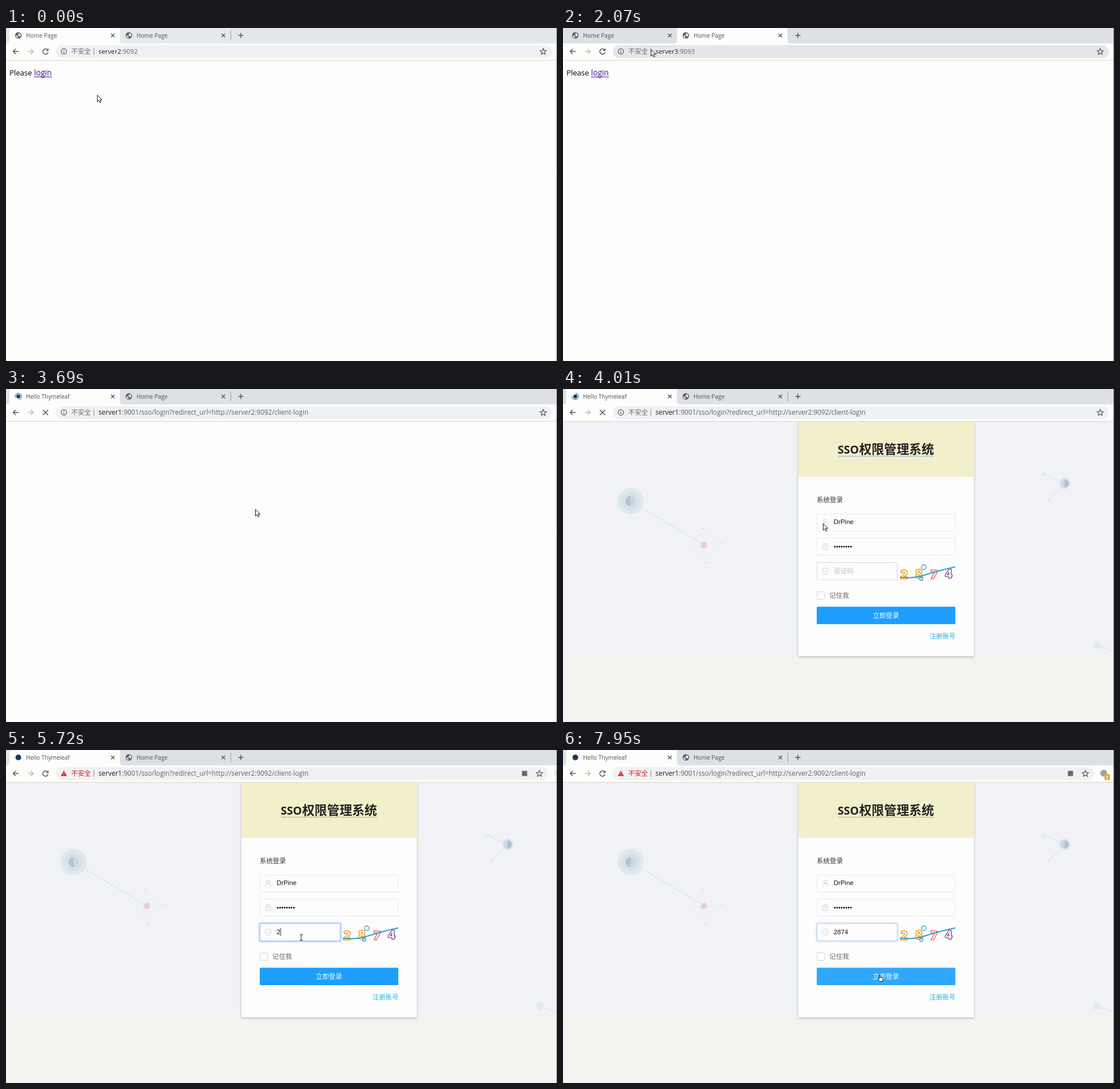
Animation, 962 px wide and 582 px high, one loop 7.99 s. Source, as an HTML page:

```html
<!DOCTYPE html>
<html lang="zh-CN">
<head>
<meta charset="utf-8">
<title>SSO login</title>
<style>
html, body { margin: 0; width: 100%; height: 100%; overflow: hidden; background: #fdfdfb; }
svg { display: block; }
text { font-family: "Open Sans", "Noto Sans CJK SC", "Noto Sans CJK", sans-serif; white-space: pre; }
.cjk { font: 11.4px "Noto Sans CJK SC", "Noto Sans CJK", sans-serif; }
.field { font: 11.4px "Liberation Sans", Arial, sans-serif; fill: #111; }
.tab { font-size: 10.1px; fill: #4b5054; }
.url { font-size: 11.35px; fill: #5f6368; }
.long { font-size: 11.7px; }
.host { fill: #202124; }
.line { fill: none; stroke: #54585c; stroke-width: 1.5; }
.soft { fill: none; stroke: #cfcfcf; }
.box { fill: #fdfdfd; stroke: #ebebeb; }

/* step: hard switches, ease: continuous motion */
.step { animation: 7.99s step-end infinite; }
.ease { animation: 7.99s linear infinite; }

#strip { animation-name: strip; }
@keyframes strip { 0% { fill: #e2e8ea } 18.77%, 100% { fill: #dde1e6 } }
.first { animation-name: first; }
@keyframes first { 0% { opacity: 1 } 18.77% { opacity: 0 } 31.79%, 100% { opacity: 1 } }
.second { animation-name: second; }
@keyframes second { 0% { opacity: 0 } 18.77% { opacity: 1 } 31.79%, 100% { opacity: 0 } }
#hover2 { animation-name: hover2; }
@keyframes hover2 { 0%, .5% { opacity: .12 } 2.5%, 14.4% { opacity: 0 } 16.2%, 18.7% { opacity: .7 } 18.8%, 100% { opacity: 0 } }
#hover1 { animation-name: hover1; }
@keyframes hover1 { 0%, 29.6% { opacity: 0 } 31%, 31.7% { opacity: .7 } 31.8%, 100% { opacity: 0 } }
#divider { animation-name: divider; }
@keyframes divider { 0% { opacity: 1 } 14.8% { opacity: 0 } 31.79%, 100% { opacity: 1 } }
.before { animation-name: before; }
@keyframes before { 0% { opacity: 1 } 43.8%, 100% { opacity: 0 } }
.after { animation-name: after; }
@keyframes after { 0% { opacity: 0 } 43.8%, 100% { opacity: 1 } }
.idle { animation-name: idle; }
@keyframes idle { 0% { opacity: 1 } 39.42% { opacity: 0 } 53.82%, 100% { opacity: 1 } }
.busy { animation-name: busy; }
@keyframes busy { 0% { opacity: 0 } 39.42% { opacity: 1 } 53.82%, 100% { opacity: 0 } }
#globe { animation-name: globe; }
@keyframes globe { 0% { opacity: 1 } 39.42%, 100% { opacity: 0 } }
#logo { animation-name: logo; }
@keyframes logo { 0%, 43.8% { r: 3.4px } 53.82%, 100% { r: 5px } }
#spin { animation: spin .99875s linear infinite; transform-origin: 21.5px 13px; }
@keyframes spin { to { transform: rotate(360deg) } }

#bar { animation-name: bar; }
@keyframes bar {
  0%, 21% { fill: #eff0f2; width: 866px } 22.5%, 27.9% { fill: #e6e7e9; width: 866px }
  29.5%, 71.09% { fill: #eff1f3; width: 866px } 73.09%, 100% { fill: #eff1f3; width: 840px }
}
#actions { animation-name: actions; }
@keyframes actions { 0%, 71.09% { transform: none } 73.09%, 100% { transform: translateX(-26px) } }
#extension { animation-name: extension; }
@keyframes extension { 0%, 71.09% { transform: translateX(26px); opacity: 0 } 73.09%, 100% { transform: none; opacity: 1 } }
#translate { animation-name: translate; }
@keyframes translate { 0% { opacity: 0 } 55.07%, 100% { opacity: 1 } }
#pill { animation-name: pill; }
@keyframes pill { 0%, 55% { opacity: 0 } 55.6%, 64.5% { opacity: 1 } 69%, 100% { opacity: 0 } }
.safe { animation-name: safe; }
@keyframes safe { 0% { opacity: 1 } 68.96%, 100% { opacity: 0 } }
.warn { animation-name: warn; }
@keyframes warn { 0% { opacity: 0 } 68.96%, 100% { opacity: 1 } }

#login { animation-name: login; }
@keyframes login { 0% { opacity: 0 } 49.69%, 100% { opacity: 1 } }
#focus { animation-name: focus; }
@keyframes focus { 0%, 60.83% { opacity: 0 } 64.6%, 98.4% { opacity: 1 } 99.5%, 100% { opacity: .5 } }
#typed { animation-name: typed; }
@keyframes typed { 0% { width: 0 } 68.96% { width: 6.5px } 76.6% { width: 12.9px } 82.23% { width: 19.2px } 90.86%, 100% { width: 32px } }
#caret { animation-name: caret; }
@keyframes caret {
  0% { opacity: 0; transform: none } 60.83% { opacity: 1; transform: none } 67.46% { opacity: 0; transform: none }
  68.96% { opacity: 1; transform: translateX(6.3px) } 75.59% { opacity: 0; transform: translateX(6.3px) }
  76.6% { opacity: 1; transform: translateX(12.7px) } 82.23% { opacity: 1; transform: translateX(19px) }
  88.73% { opacity: 0; transform: translateX(19px) } 90.86% { opacity: 1; transform: translateX(25.4px) }
  97.5%, 100% { opacity: 0; transform: translateX(25.4px) }
}
#button { animation-name: button; }
@keyframes button { 0%, 96% { fill: #1e9fff } 97.6%, 100% { fill: #30a7fe } }

#mouse { animation-name: mouse; animation-timing-function: ease-in-out; }
@keyframes mouse {
  0%, 8.1% { transform: translate(159px, 117px) }
  9% { transform: translate(161px, 120px) }
  15.6%, 18.8% { transform: translate(249.3px, 20px) }
  22.8% { transform: translate(175px, 62px) }
  25.9% { transform: translate(153.3px, 37px) }
  27.9% { transform: translate(150px, 40px) }
  31%, 32.3% { transform: translate(110px, 14px) }
  37.5%, 39.2% { transform: translate(64px, 77px) }
  46.2% { transform: translate(435px, 210px) }
  48.2%, 49.2% { transform: translate(452px, 232px) }
  57.5%, 91.4% { transform: translate(515.5px, 327.5px) }
  98.1%, 100% { transform: translate(553px, 393px) }
}
#arrow { animation-name: arrow; }
@keyframes arrow { 0% { opacity: 1 } 36.6% { opacity: 0 } 39.6% { opacity: 1 } 55.6% { opacity: 0 } 93.2% { opacity: 1 } 96%, 100% { opacity: 0 } }
#hand { animation-name: hand; }
@keyframes hand { 0% { opacity: 0 } 36.6% { opacity: 1 } 39.6% { opacity: 0 } 96%, 100% { opacity: 1 } }
#beam { animation-name: beam; }
@keyframes beam { 0% { opacity: 0 } 55.6% { opacity: 1 } 93.2%, 100% { opacity: 0 } }
</style>
</head>
<body>
<svg width="962" height="582" viewBox="0 0 962 582">
  <defs>
    <path id="tabShape" d="M0 27Q6 27 6 21V3Q6 0 9 0H196Q199 0 199 3V21Q199 27 205 27Z"/>
    <path id="cross" d="M-3 -3L3 3M3 -3L-3 3"/>
    <g id="world">
      <circle r="5.7" fill="#5a5f64"/>
      <path d="M-4.4 -.6L-1.2 1.2V2.8L.6 4.6Q-4 4.6 -4.4 -.6ZM.4 -4.4Q3.9 -3.6 4.3 .6L2.6 2.4 1.8 .4H-.9V-1.2L1 -2Z" fill="#f4f6f7"/>
    </g>
    <filter id="shade" x="-5%" y="-5%" width="110%" height="110%"><feGaussianBlur stdDeviation="2"/></filter>
    <filter id="glow" x="-10%" y="-30%" width="120%" height="160%"><feGaussianBlur stdDeviation="1.3"/></filter>
    <clipPath id="typing"><rect id="typed" class="step" x="472" y="305" width="0" height="26"/></clipPath>
  </defs>

  <rect width="962" height="582" fill="#fdfdfb"/>

  <g class="step before">
    <text x="6" y="83" font-size="13.1" fill="#000">Please</text>
    <text x="49" y="83" font-size="13.6" fill="#40128b">login</text>
    <path d="M49 85.5H80" stroke="#40128b"/>
  </g>

  <g id="login" class="step">
    <rect y="57" width="962" height="406" fill="#f0f2f5"/>
    <rect y="463" width="962" height="119" fill="#f3f4f0"/>
    <g fill="none" stroke="#d3dde6">
      <path d="M118 196L246 272M840 149L876 165L848 194M932 448L962 458"/>
      <circle cx="246" cy="272" r="19" stroke="#e3e6ea" stroke-dasharray="2 3"/>
      <circle cx="840" cy="149" r="3" fill="#f0f2f5"/>
    </g>
    <circle cx="118" cy="196" r="23" fill="#e1e8ed"/>
    <circle cx="118" cy="196" r="16" fill="#d7e1e9"/>
    <circle cx="118" cy="196" r="9" fill="#c9d6e0"/>
    <path d="M118 187A9 9 0 0 0 118 205Z" fill="#b3c5d5"/>
    <circle cx="246" cy="272.500" r="5.500" fill="#eccbd1"/>
    <g fill="#d5dade">
      <circle cx="244" cy="244" r="1.500"/><circle cx="278" cy="270" r="1.500"/><circle cx="249.500" cy="303" r="1.500"/>
    </g>
    <circle cx="876" cy="165" r="10" fill="#dde5eb"/>
    <circle cx="876" cy="165" r="7" fill="#cbd7e0"/>
    <path d="M876 158A7 7 0 0 1 876 172Z" fill="#b0c0cf"/>
    <circle cx="848" cy="194" r="2" fill="#ebe0bd"/>
    <circle cx="932" cy="448" r="7" fill="#e6eaef"/>

    <rect x="411" y="58" width="306.500" height="410.500" fill="#8c929b" opacity=".6" filter="url(#shade)"/>
    <rect x="411" y="57" width="306.500" height="410" fill="#fdfdfd"/>
    <rect x="411" y="57" width="306.500" height="96.500" fill="#f2efcb"/>
    <g fill="#222" font-weight="700">
      <text x="479.500" y="113" font-size="19.500">SSO</text>
      <text x="517" y="113" font-size="21.800" style="font-family:'Noto Sans CJK SC','Noto Sans CJK',sans-serif">权限管理系统</text>
    </g>
    <path d="M480 117.500H648" stroke="#8fb4d6"/>
    <text class="cjk" x="443" y="198" fill="#333">系统登录</text>

    <rect class="box" x="443.500" y="218.500" width="241" height="30" rx="1"/>
    <rect class="box" x="443.500" y="260.500" width="241" height="30" rx="1"/>
    <rect class="box" x="443.500" y="303.500" width="140" height="30" rx="1" style="stroke:#d9d9d9"/>
    <g id="focus" class="ease" fill="none">
      <rect x="443" y="303" width="141" height="31" rx="1" stroke="#a9ccf5" stroke-width="3" filter="url(#glow)"/>
      <rect x="443.500" y="303.500" width="140" height="30" rx="1" fill="#fdfdfd" stroke="#9cc3f2"/>
    </g>
    <g class="soft">
      <circle cx="458" cy="230" r="3"/><path d="M453 238Q453.500 233.500 458 233.500T463 238"/>
      <path d="M453.500 273.500H462.500V280.500H453.500ZM455 273.500V270.500H461V273.500M456 277H460"/>
      <path d="M458 312.500L463 314.500V319Q462 323 458 324.500Q454 323 453 319V314.500ZM455.500 318L457.500 320L460.800 316.500"/>
    </g>
    <text class="field" x="472.500" y="236">DrPine</text>
    <path d="M474.500 275.500H504" stroke="#111" stroke-width="3" stroke-linecap="round" stroke-dasharray="0 4.020"/>
    <text class="cjk step safe" x="473" y="322" fill="#c3c3c3">验证码</text>
    <text class="field" x="472.500" y="322" clip-path="url(#typing)">2874</text>
    <path id="caret" class="step" d="M473 311V325" stroke="#222"/>

    <g font-size="22" font-weight="800" fill="#fff" stroke-width="1.700" stroke-linejoin="round">
      <text x="589" y="332" stroke="#f0a125">2</text>
      <text x="615" y="331" stroke="#f3a526">8</text>
      <text x="641" y="332" stroke="#ee7272" transform="rotate(6 648 324)">7</text>
      <text x="667" y="331" stroke="#98699b">4</text>
    </g>
    <g fill="none" stroke="#2b9fca">
      <path d="M588 329C625 333 630 322 685 311" stroke-width="2"/>
      <circle cx="630" cy="311.500" r="4" stroke-width="1.300"/>
      <circle cx="625.500" cy="331.500" r="3" stroke-width="1.300"/>
    </g>

    <rect x="443.500" y="354.500" width="13" height="13" rx="1" fill="#fff" stroke="#d6d6d6"/>
    <text class="cjk" x="465" y="364.500" fill="#666">记住我</text>
    <rect id="button" class="ease" x="443" y="380.500" width="242" height="30.500" rx="1.500"/>
    <text class="cjk" x="541" y="399.500" fill="#fff">立即登录</text>
    <text class="cjk" x="639.500" y="435.500" fill="#2bb0dc">注册账号</text>
  </g>

  <!-- browser frame -->
  <rect id="strip" class="step" width="962" height="27"/>
  <rect id="hover1" class="ease" x="6" width="193" height="27" fill="#fafbfc"/>
  <rect id="hover2" class="ease" x="199" width="193" height="27" rx="3" fill="#fafbfc"/>
  <use class="step first" href="#tabShape" fill="#fdfdfc"/>
  <g class="step second"><use href="#tabShape" x="193" fill="#fdfdfc"/></g>
  <rect y="27" width="962" height="29" fill="#fdfdfc"/>
  <path d="M0 56.500H962" stroke="#d8d7c8"/>
  <path id="divider" class="step" d="M392.500 5V21" stroke="#989da2"/>

  <g id="globe" class="step"><use href="#world" x="21.500" y="13"/></g>
  <g class="step after"><circle id="logo" class="step" cx="21.500" cy="13" r="5" fill="#173a63"/></g>
  <g class="step busy"><path id="spin" d="M21.500 7.500A5.500 5.500 0 1 1 16 13" fill="none" stroke="#3c6db4" stroke-width="1.300"/></g>
  <text class="tab step before" x="35" y="17">Home Page</text>
  <text class="tab step after" x="35" y="17">Hello Thymeleaf</text>
  <use href="#world" x="214.500" y="13"/>
  <text class="tab" x="228" y="17">Home Page</text>
  <g class="line">
    <use href="#cross" x="186.500" y="13"/>
    <use href="#cross" x="379.500" y="13"/>
    <path d="M405.500 13H414.500M410 8.500V17.500"/>
    <path d="M22 41H12.500M17 36.500L12.500 41L17 45.500"/>
    <path d="M38 41H47.500M43 36.500L47.500 41L43 45.500" stroke="#b9bcbf"/>
    <path class="step idle" d="M72.500 38A4.700 4.700 0 1 0 73.500 42.500M73.500 36V39.500H70"/>
    <path class="step busy" d="M64.500 36.500L73.500 45.500M73.500 36.500L64.500 45.500"/>
  </g>

  <rect id="bar" class="ease" x="87" y="30" width="866" height="22.500" rx="11.250"/>
  <g class="step safe">
    <circle cx="101" cy="41" r="4.800" fill="none" stroke="#5f6368" stroke-width="1.200"/>
    <path d="M101 40.300V44M101 38V39.300" stroke="#5f6368" stroke-width="1.200"/>
    <text class="cjk" x="114" y="45" fill="#6a6e72">不安全</text>
  </g>
  <g class="step warn" fill="#c5221f">
    <path d="M101 36L106.200 45.500H95.800Z"/>
    <path d="M101 39.200V42.300M101 43.200V44.400" stroke="#fff"/>
    <text class="cjk" x="114" y="45">不安全</text>
  </g>
  <path d="M153.500 35V47" stroke="#8b9095"/>
  <g class="step before">
    <text class="url step first" x="161.500" y="45"><tspan class="host">server2</tspan>:9092</text>
    <text class="url step second" x="161.500" y="45"><tspan class="host">server3</tspan>:9093</text>
  </g>
  <text class="url long step after" x="161.500" y="45"><tspan class="host">server1</tspan>:9001/sso/login?redirect_url=http://server2:9092/client-login</text>

  <g id="actions" class="ease">
    <rect id="pill" class="ease" x="899.500" y="31.500" width="25.500" height="19.500" rx="9.750" fill="#c3c6c9"/>
    <rect id="translate" class="step" x="907.500" y="36.500" width="9" height="9" fill="#63686d"/>
    <path d="M938 35.800L939.500 39.300L943.300 39.700L940.500 42.200L941.300 46L938 44L934.700 46L935.500 42.200L932.700 39.700L936.500 39.300Z" fill="none" stroke="#4f5458" stroke-width="1.200"/>
  </g>
  <g id="extension" class="ease">
    <circle cx="944" cy="40.500" r="6" fill="#93aa9c"/>
    <rect x="945.500" y="42" width="9.500" height="10.500" rx="1.500" fill="#eda53a"/>
    <text x="948" y="50.500" font-size="8" font-weight="700" fill="#fff">1</text>
  </g>
  <path d="M961.500 0V582" stroke="#74777a"/>

  <g id="mouse" class="ease">
    <path id="arrow" class="step" d="M.500 .500V12L3.200 9.400L5 13.500L7 12.600L5.200 8.600H8.800Z" fill="#fff" stroke="#111"/>
    <path id="hand" class="step" d="M-.900 .500Q0 -.600 .900 .500V4.300L4.500 5Q6 5.500 5.800 7L5 11.500H-.300L-3.300 7.500Q-3.500 6 -1.900 6.500L-.900 7.300Z" fill="#fff" stroke="#111"/>
    <path id="beam" class="step" d="M-2.500 -5H2.500M0 -5V5M-2.500 5H2.500" fill="none" stroke="#111"/>
  </g>
</svg>
</body>
</html>
```
